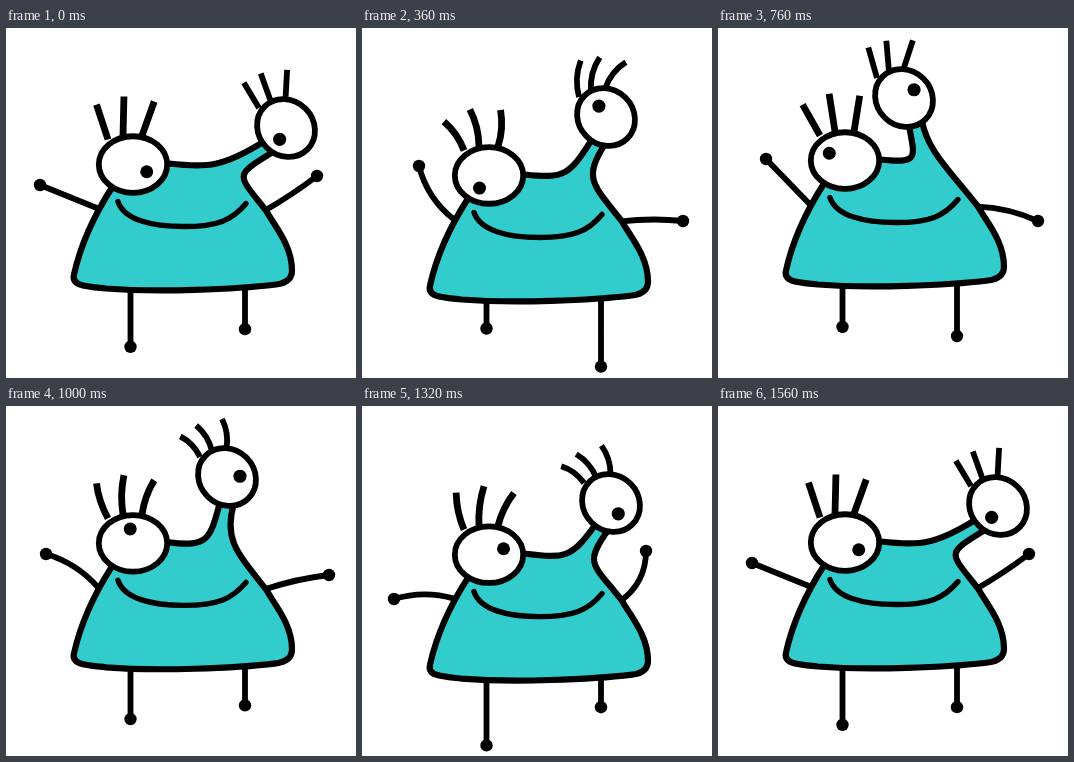
These frames come from a looping animation (350x350 px, 1.6 s). An HTML page:

```html
<!DOCTYPE html>
<html lang="en">
<head>
<meta charset="utf-8">
<title>Wobbling creature</title>
<style>
  html, body { margin: 0; width: 100%; height: 100%; overflow: hidden; background: #fff; }
  svg { display: block; width: 100vw; height: 100vh; }
</style>
</head>
<body>
<svg viewBox="0 0 350 350" fill="none" stroke="#000" stroke-width="5.8" stroke-linecap="round" stroke-linejoin="round">
  <path id="limbs"/>
  <g id="ends" fill="#000" stroke="none">
    <circle r="6.2"/><circle r="6.2"/><circle r="6.2"/><circle r="6.2"/>
  </g>
  <path id="body" fill="#3cc" stroke-width="6.2"/>
  <path id="mouth" stroke-width="5.4"/>
  <path id="lashesL" stroke-width="6.8" stroke-linecap="butt"/>
  <path id="lashesR" stroke-width="5.8" stroke-linecap="butt"/>
  <g id="eyeL">
    <ellipse rx="34.2" ry="28.3" fill="#fff"/>
    <circle r="6.5" fill="#000" stroke="none"/>
  </g>
  <g id="eyeR">
    <ellipse rx="30.3" ry="27.5" fill="#fff" transform="rotate(45)"/>
    <circle r="6.6" fill="#000" stroke="none"/>
  </g>
</svg>
<script>
const STEP = 80, STEPS = 20;
const $ = id => document.getElementById(id);
const rad = deg => deg * Math.PI / 180;
const add = (p, q) => [p[0] + q[0], p[1] + q[1]];
const polar = (deg, rx, ry = rx) => [rx * Math.cos(rad(deg)), ry * Math.sin(rad(deg))];
const below = (deg, r) => polar(90 + deg, r);
const line = (id, d) => $(id).setAttribute('d', d);

// Cosine with its crest at the given step, n crests per loop
const wave = (k, crest, n = 1) => Math.cos(2 * Math.PI * n * (k - crest) / STEPS);

// Smooth closed path through [step, x, y] points
function loop(pts) {
  const n = pts.length;
  const at = i => {
    const [t, x, y] = pts[(i + n) % n];
    return [t + STEPS * Math.floor(i / n), x, y];
  };
  const slope = (i, c) => {
    const p = at(i - 1), q = at(i), r = at(i + 1);
    const a = q[0] - p[0], b = r[0] - q[0];
    return ((q[c] - p[c]) / a * b + (r[c] - q[c]) / b * a) / (a + b);
  };
  return k => {
    let i = n - 1;
    while (pts[i][0] > k) i--;
    const p = at(i), q = at(i + 1), h = q[0] - p[0];
    const u = (k - p[0]) / h, v = 1 - u;
    return [1, 2].map(c => v * v * (1 + 2 * u) * p[c] + u * u * (3 - 2 * u) * q[c]
      + h * u * v * (v * slope(i, c) - u * slope(i + 1, c)));
  };
}

const eyePath = loop([[0, 280, 100], [5, 244, 89], [7, 207, 83], [10, 186, 70], [13, 221, 71], [17, 249, 97]]);
const handL = loop([[0, 34, 157], [5, 57, 138], [7, 63, 135], [10, 48, 131], [13, 40, 148], [17, 32, 193]]);
const handR = loop([[0, 311, 148], [5, 321, 193], [7, 318, 213], [10, 320, 193], [13, 323, 169], [17, 284, 145]]);
const bounce = k => 4 + 2 * wave(k, 0) + 8 * wave(k, 6, 2);
const foot = (k, crest) => 312.5 + 18.5 * wave(k, crest) + 8.5 * wave(k, crest, 2);

// Bowed stroke from root to tip
function bow(a, b, bend) {
  const dx = b[0] - a[0], dy = b[1] - a[1], s = bend / Math.hypot(dx, dy);
  return `M${a}Q${(a[0] + b[0]) / 2 - dy * s} ${(a[1] + b[1]) / 2 + dx * s} ${b}`;
}

// Root and tip of each lash, relative to the eye centre
const lashL = [[-25, -25, -39.5, -58], [-10, -29, -12.5, -67.5], [9, -29, 18, -64]];
const lashR = [[-27, -20, -39, -48], [-15, -26, -21.5, -56], [-.5, -29, 5, -58]];

function lashes(set, eye, turn, bend) {
  const c = Math.cos(rad(turn)), s = Math.sin(rad(turn));
  return set.map(([x, y, tx, ty]) =>
    bow(add(eye, [x, y]), add(eye, [tx * c - ty * s, tx * s + ty * c]), bend)).join('');
}

function placeEye(id, pos, look) {
  $(id).setAttribute('transform', `translate(${pos})`);
  $(id).lastElementChild.setAttribute('transform', `translate(${look})`);
}

function draw(k) {
  const b = bounce(k), y = v => v + b, swing = wave(k, 5);
  const left = [127, y(137)], right = eyePath(k);

  // Arms and legs
  const ends = [handL(k), handR(k), [124.5, foot(k, 16.8)], [239, foot(k, 5.6)]];
  line('limbs', bow([92, y(181)], ends[0], -11 * swing)
    + bow([259, y(183)], ends[1], 7 * (wave(k, 17) + wave(k, 17, 2)))
    + `M124.5 250V${ends[2][1]}M239 250V${ends[3][1]}`);
  ends.forEach((p, i) => $('ends').children[i].setAttribute('transform', `translate(${p})`));

  // The neck leans further the more the eye reaches to the right
  const lean = (right[0] - 200) * .73;
  const pull = below(lean, 34 + lean * .2);
  const n1 = add(right, below(lean, 28)), n2 = add(right, below(lean - 29, 28));
  line('body', `M127 ${y(136)}H163C202 ${y(140.5)} ${add(n1, pull)} ${n1}L${right}L${n2}`
    + `C${add(n2, pull)} 231 ${y(146)} 260 ${y(183)}`
    + `C269 ${y(199)} 286 ${y(218)} 286 ${y(243)}Q286 ${y(255)} 270 ${y(257)}`
    + `C230 ${y(262)} 150 ${y(265)} 100 ${y(261)}C82 ${y(259)} 65 ${y(259)} 68 ${y(247)}`
    + `C74 ${y(220)} 88 ${y(188)} 106 ${y(160)}Z`);
  line('mouth', `M112 ${y(174)}C118 ${y(192)} 145 ${y(199)} 178 ${y(199)}`
    + `S226 ${y(193)} 240 ${y(176)}`);

  line('lashesL', lashes(lashL, left, 6.4 * wave(k, 16.5), 4.5 * swing));
  line('lashesR', lashes(lashR, right, 15.5 * wave(k, 5.8), -6 * swing));

  const turn = 360 * k / STEPS;
  placeEye('eyeL', left, add([-1, 0], polar(turn + 30, 17, 14.5)));
  placeEye('eyeR', right, polar(turn + 130 + 20 * wave(k, 6.8), 13));
}

function tick() {
  draw(Math.floor(performance.now() / STEP + .5) % STEPS);
  requestAnimationFrame(tick);
}
tick();
</script>
</body>
</html>
```
